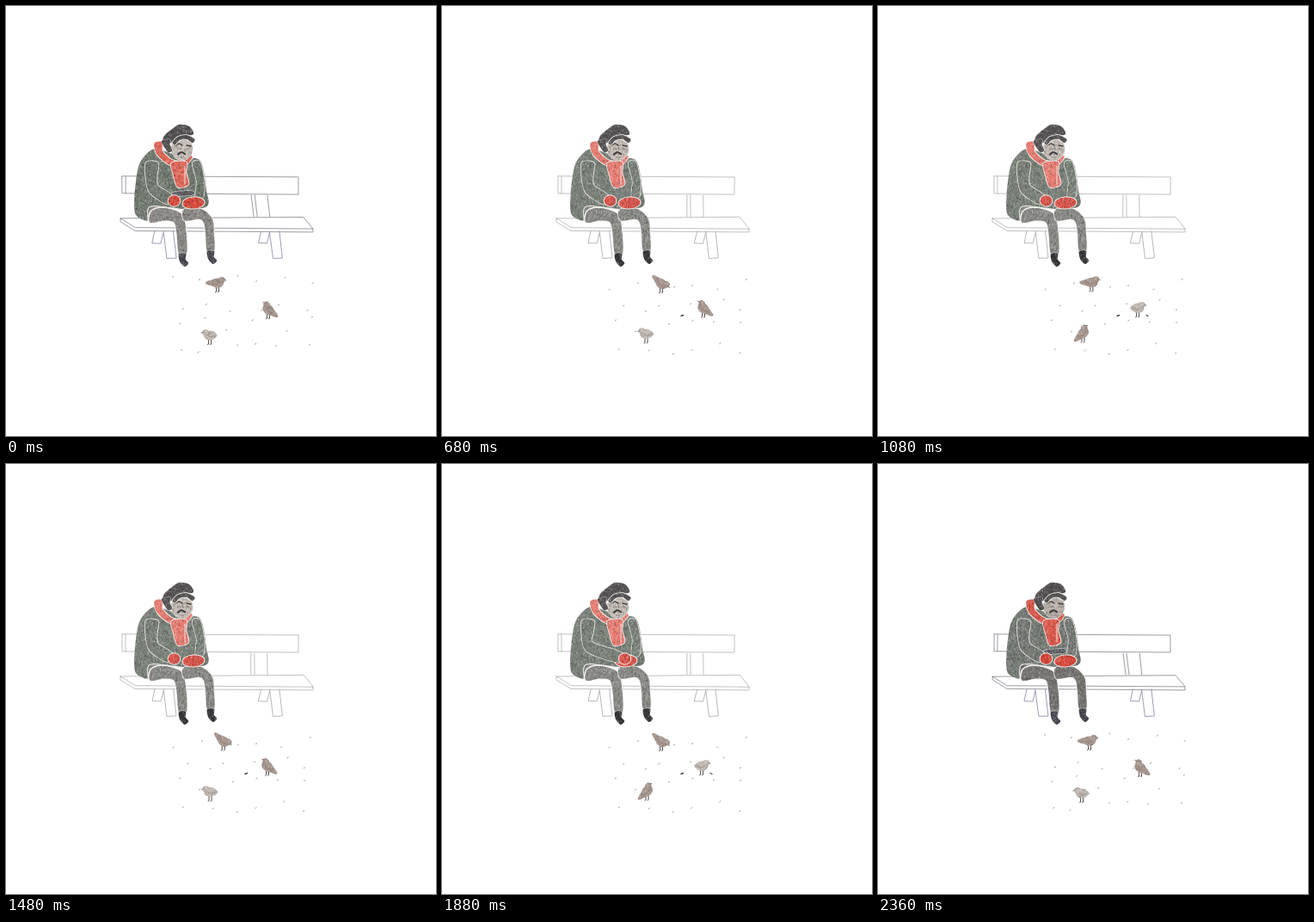
These frames come from a looping animation (500 px wide and 500 px high, 2.4 s). An HTML page with a canvas:

```html
<!DOCTYPE html>
<html lang="en">
<head>
<meta charset="utf-8">
<title>Man on a bench</title>
<style>
html, body { margin: 0; width: 100%; height: 100%; overflow: hidden; background: #fff; }
canvas { display: block; width: 500px; height: 500px; }
</style>
</head>
<body>
<canvas id="stage" width="500" height="500"></canvas>
<script>
const ctx = document.getElementById('stage').getContext('2d');
const LOOP = 2400, STEP = 40, SLOT = 400, GRAIN = 160;

// Pencil pressure of the repeating hand-drawn cels
const FIRM = { coat: '#727a71', legs: '#8b8885', scarf: '#e5685a', glove: '#d94638', hat: '#535051',
  face: '#c8bfb9', boot: '#45454d', line: '#7b7b86', leg: '#7c7c9c', soft: false };
const SOFT = { ...FIRM, coat: '#7a8179', legs: '#8a8a87', scarf: '#ea7d73', glove: '#e0574d', hat: '#565354',
  boot: '#333336', line: '#adadb0', leg: '#a0a0a6', soft: true };
const DARK = { ...FIRM, coat: '#757b74', legs: '#757370', scarf: '#e0594c', face: '#b9b1ab' };
const CELS = [FIRM, FIRM, SOFT, SOFT, DARK];

// A bird rests on every n-th slot and is active in the others
const BIRDS = [
  { every: 3, rest: { x: 246, y: 322, tilt: 0, facing: 1 }, active: { x: 255, y: 324, tilt: .75, facing: 1 } },
  { every: 2, rest: { x: 305, y: 353, tilt: -.65, facing: -1 }, active: { x: 301, y: 352, tilt: 0, facing: 1, pale: true } },
  { every: 2, rest: { x: 237, y: 383, tilt: 0, facing: -1, pale: true }, active: { x: 239, y: 381, tilt: -.75, facing: 1 } }
];

let seed = 1;
function random() {
  seed = (seed * 16807) % 2147483647;
  return seed / 2147483647;
}
const wobble = amount => (random() - .5) * amount;
const mix = (a, b, k) => a + (b - a) * k;
function ease(v) {
  v = Math.max(0, Math.min(1, v));
  return v * v * (3 - 2 * v);
}

function makeGrain(index) {
  const tile = document.createElement('canvas');
  tile.width = tile.height = GRAIN;
  const pen = tile.getContext('2d');
  seed = 1009 + index * 7919;
  for (let i = 0; i < GRAIN * GRAIN * .6; i++) {
    const tone = random() < .5 ? '255,255,255' : '30,30,30';
    pen.fillStyle = `rgba(${tone},${random() * .28})`;
    pen.fillRect(random() * GRAIN, random() * GRAIN, .9, .9 + random() * 1.5);
  }
  return ctx.createPattern(tile, 'repeat');
}
const GRAINS = CELS.map((_, i) => makeGrain(i));
let grain;

// Smooth curve through a few key points
function curve(points, closed = true, tension = .14) {
  const path = new Path2D(), n = points.length;
  const at = i => points[closed ? (i + n) % n : Math.max(0, Math.min(n - 1, i))];
  path.moveTo(...points[0]);
  for (let i = 0; i < n - !closed; i++) {
    const [a, b, c, d] = [at(i - 1), at(i), at(i + 1), at(i + 2)];
    path.bezierCurveTo(b[0] + (c[0] - a[0]) * tension, b[1] + (c[1] - a[1]) * tension,
      c[0] - (d[0] - b[0]) * tension, c[1] - (d[1] - b[1]) * tension, ...c);
  }
  if (closed) path.closePath();
  return path;
}

function oval(x, y, rx, ry, turn = 0) {
  const path = new Path2D();
  path.ellipse(x, y, rx, ry, turn, 0, 7);
  return path;
}

// Tapering outline around a centre line
function limb(points, from, to) {
  const sides = [[], []];
  points.forEach(([x, y], i) => {
    const a = points[Math.max(0, i - 1)], b = points[Math.min(points.length - 1, i + 1)];
    const angle = Math.atan2(b[1] - a[1], b[0] - a[0]);
    const half = mix(from, to, i / (points.length - 1)) / 2;
    const dx = -Math.sin(angle) * half, dy = Math.cos(angle) * half;
    sides[0].push([x + dx, y + dy]);
    sides[1].unshift([x - dx, y - dy]);
  });
  return curve(sides.flat());
}

// Flat colour with pencil grain and a pale gap around it
function shade(path, color, gap = 0) {
  if (gap) {
    ctx.strokeStyle = '#f3f2ef';
    ctx.lineWidth = gap * 2;
    ctx.stroke(path);
  }
  for (const fill of [color, grain]) {
    ctx.fillStyle = fill;
    ctx.fill(path);
  }
}

function line(points, color, width = .8) {
  ctx.strokeStyle = color;
  ctx.lineWidth = width;
  ctx.stroke(curve(points, false));
}

function ruled(points, color) {
  ctx.strokeStyle = color;
  ctx.lineWidth = .75;
  ctx.beginPath();
  points.forEach(([x, y]) => ctx.lineTo(x + wobble(.5), y + wobble(.5)));
  ctx.stroke();
}

function drawBench(cel) {
  const left = 135, right = 340, top = 198, lean = cel.soft ? 0 : 3;
  ruled([[left, top], [right, top + 1], [right, top + 21], [left, top + 20], [left, top]], cel.line);
  ruled([[left + 4, top], [left + 4, top + 20]], cel.line);
  for (const x of [285, 289, 304]) ruled([[x, top + 22], [x + lean, 245]], cel.line);

  const front = [[133, 247], [150, 257.5], [357, 259]];
  ruled([...front, [346, 245.5], front[0]], cel.line);
  ruled([front[0], ...front.map(([x, y]) => [x, y + 4]), front[2]], cel.line);
  for (const x of [183, 306.5]) {
    ruled([[x, 262], [x + 4, 293.5], [x + 15, 293], [x + 11.5, 262]], cel.leg);
    ruled([[x - 10, 262], [x - 13, 275.5], [x - 3, 276], [x, 264]], cel.leg);
  }
}

function drawBody(cel) {
  shade(curve([[174, 166], [159, 177], [153, 191], [149.5, 220], [150, 241], [158, 248], [167, 249],
    [180, 237], [232, 234], [233, 214], [226, 180], [205, 176]]), cel.coat);
  shade(limb([[167, 243], [184, 242], [200, 247], [204, 264], [205.5, 288]], 17, 9), cel.legs, 1);
  shade(limb([[207, 243], [226, 242], [235, 250], [237, 265], [238, 284]], 13, 8.5), cel.legs, .8);
  line([[165, 251], [168, 239], [180, 234], [206, 237]], '#f3f2ef', 1.6);
  for (const [x, y] of [[205, 288], [238, 285]])
    shade(limb([[x, y], [x + .5, y + 8], [x + 5, y + 13]], 8, 6), cel.boot, .5);
}

function drawArms(cel, reach) {
  const shift = reach * 17;
  shade(limb([[221, 182], [226, 203], [225, 222]], 9, 9), cel.coat, .7);
  shade(oval(218 - reach * 4, 229, 12.5, 6.5, -.08), cel.glove, 1);
  if (!cel.soft) shade(limb([[195, 218.5], [217, 217.5]], 4.5, 4.5), '#605f63', .6);
  shade(limb([[170, 182], [169, 198], [172, 213], [190 + shift, 225]], 14, 12), cel.coat, .8);
  shade(oval(195.5 + shift, 226.5, 6.8, 6.2), cel.glove, 1);
}

function drawHead(cel) {
  const ink = '#403d3f';
  shade(limb([[177, 159], [179, 171], [192, 182], [207, 183], [215, 175]], 9, 4), cel.scarf, .9);
  shade(limb([[201, 182], [202, 195], [206, 209]], 17, 13), cel.scarf, .9);
  line([[208, 186], [208, 207]], '#f6ddd7', 1.1);
  shade(oval(204.5, 166, 12.5, 13.5, -.1), cel.face, .5);

  line([[197, 162], [201, 160], [205, 162]], ink, 1.4);
  line([[210, 162], [215, 163]], ink, 1.4);
  for (const x of [200, 210]) line([[x, 166], [x + 4, 166]], '#77706c');
  line([[200, 172.5], [204, 170], [208, 172]], ink, 2.2);
  line([[203, 176], [207, 176]], '#8a7772');

  shade(curve([[182, 161], [184, 151], [192, 144], [201, 138], [213, 140], [218, 149], [206, 152], [195, 158]]), cel.hat, .5);
  shade(limb([[186, 156], [187, 162], [191, 169]], 10, 5), cel.hat, .4);
  shade(limb([[195, 160], [201, 154], [210, 152.5], [218, 157]], 4, 5), cel.hat, .9);
}

function drawCrumbs(cel, slot) {
  const columns = 6, count = 24;
  seed = cel.soft ? 4242 : 777;
  for (let i = 0; i < count; i++) {
    const x = 194 + (i % columns) * 29 + random() * 18;
    const y = 311 + Math.floor(i / columns) * 25 + random() * 19;
    line([[x - .6, y + .4], [x + .6, y - .4]], '#8d8d92', .9);
  }
  if (!cel.soft) return;
  line([[278, 360.5], [280.5, 359.5]], '#444', 1.4);
  if (slot > 2 && slot % 2) line([[312, 359.5], [314, 360.5]], '#444', 1.2);
}

function drawBird({ every, rest, active }, time) {
  const clock = time + SLOT / 2, slot = Math.floor(clock / SLOT);
  const poseAt = n => n % every ? active : rest;
  const pose = poseAt(slot), last = poseAt(slot + 5);
  const k = slot ? ease((clock % SLOT) / 120) : 1;
  const color = pose.pale ? '#c3bab4' : '#a8978f';

  ctx.save();
  ctx.translate(mix(last.x, pose.x, k), mix(last.y, pose.y, k) - Math.sin(k * Math.PI) * 1.5);
  for (const x of [-1.5, 1.5]) line([[x, 5], [x, 10], [x - 1, 10.5]], '#453e40', 1);
  ctx.scale(pose.facing, 1);
  ctx.rotate(pose.tilt);
  shade(limb([[-2, 0], [pose.pale ? -8 : -13, 0]], 8, 3), color);
  shade(oval(0, 0, 7.2, 5.6), color);
  shade(oval(5, -3.5, 3.8, 3.6), color);
  line([[-6, 0], [-1, 2], [3, 0]], '#85776e', .7);
  line([[8.5, -3.5], [10, -3]], '#665a53', .9);
  ctx.restore();
}

function draw(step) {
  const time = step * STEP, index = step % CELS.length, cel = CELS[index];
  const reach = ease((time - 1640) / 160) * (1 - ease((time - 2000) / 200));
  grain = GRAINS[index];
  seed = 31 + index * 977;

  ctx.fillStyle = '#fff';
  ctx.fillRect(0, 0, 500, 500);
  ctx.lineCap = ctx.lineJoin = 'round';
  drawBench(cel);
  drawBody(cel);
  drawArms(cel, reach);
  drawHead(cel);
  drawCrumbs(cel, Math.floor((time + SLOT / 2) / SLOT));
  BIRDS.forEach(bird => drawBird(bird, time));
}

let shown = -1;
function tick() {
  const step = Math.floor((performance.now() % LOOP) / STEP);
  if (step !== shown) draw(shown = step);
  requestAnimationFrame(tick);
}
tick();
</script>
</body>
</html>
```
